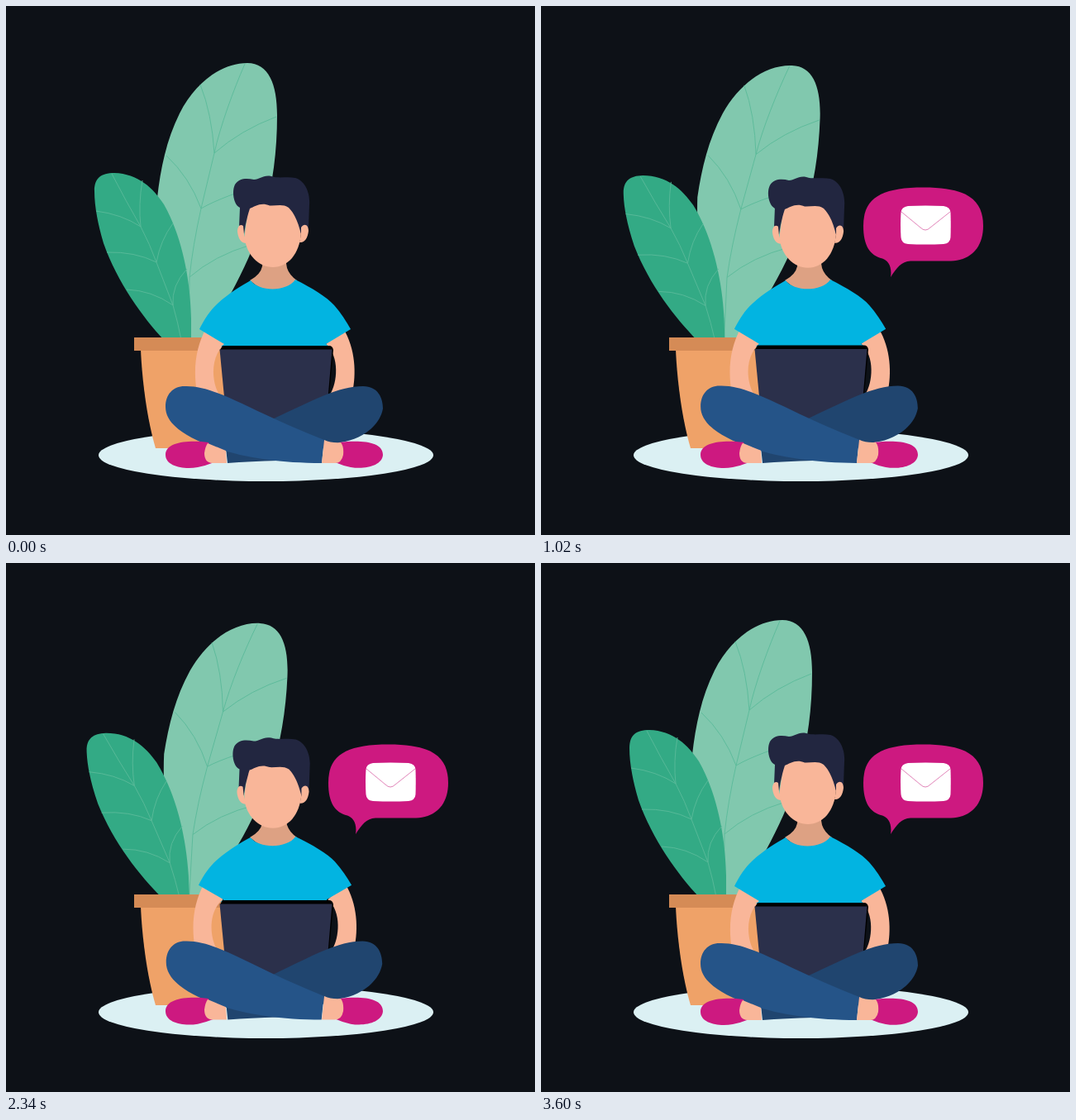
Recreate the animation shown at these times as an HTML page. Size 640x640 px, loop 3.66 s.

```html
<!DOCTYPE html>
<html lang="en">
<head>
<meta charset="utf-8">
<title>Working with a laptop</title>
<style>
  @property --sway { syntax: "<number>"; inherits: true; initial-value: 0; }
  @property --sit { syntax: "<number>"; inherits: true; initial-value: 0; }
  @property --pop { syntax: "<number>"; inherits: true; initial-value: 0; }

  html, body { margin: 0; width: 100%; height: 100%; overflow: hidden; background: #0d1117; }

  svg {
    display: block; width: 100vw; height: 100vh;
    animation: sway 3660ms infinite, sit 3660ms infinite, pop 3660ms infinite;
    animation-timing-function: cubic-bezier(.333, 0, .667, 1);
  }
  @keyframes sway { 0%, 98.36%, 100% { --sway: 0 } 49.18% { --sway: 1 } }
  @keyframes sit { 0%, 24.59%, 73.77%, 100% { --sit: 0 } 40.98%, 57.38% { --sit: 1 } }
  @keyframes pop { 0% { --pop: 0 } 21.31%, 100% { --pop: 1 } }

  .tall { transform-origin: 211px 419px; transform: rotate(calc(var(--sway) * 3.2deg)); }
  .low { transform-origin: 220px 455px; transform: rotate(calc(var(--sway) * -3deg)); }
  .face, .hair { transform-origin: 322px 260px; }
  .face { transform: translateY(calc(var(--sit) * 7.2px)) scaleX(calc(1 + var(--sit) * .02)); }
  .hair { transform: translateY(calc(var(--sit) * 8.7px)) scaleX(calc(1 + var(--sit) * .02)); }
  .shirt { transform-origin: 323px 332px; transform: scale(calc(1 + var(--sit) * .018), calc(1 - var(--sit) * .036)); }
  .arm-l { transform: translate(calc(var(--sit) * -3.7px), calc(var(--sit) * -3px)); }
  .arm-r { transform: translate(calc(var(--sit) * 3.7px), calc(var(--sit) * -3px)); }
  .laptop { transform: translateY(calc(var(--sit) * -4.6px)); }
  .feet, .legs { transform-origin: 324.5px 575px; }
  .feet { transform: scaleY(calc(1 + var(--sit) * .033)); }
  .legs { transform: scale(calc(1 - var(--sit) * .009), calc(1 + var(--sit) * .033)); }
  .bubble { transform-origin: 423px 328px; transform: scale(var(--pop)); }

  .vein { fill: none; stroke: #5bba9a; stroke-width: .9; }
  .skin { fill: #f9b699; }
  .pink { fill: #cd1980; }
</style>
</head>
<body>
<svg viewBox="0 0 640 640">
  <ellipse cx="314.5" cy="543.5" rx="202.5" ry="31.5" fill="#dbf0f3"/>

  <g class="tall">
    <path fill="#81c8ae" d="M238 404C262 368 283 330 297 296C319 243 328 190 328 132C328 95 318 69 292 69C260 69 229 93 210 130C194 162 187 197 183 232C183 300 200 360 212 413Z"/>
    <path class="vein" d="M289 70C275 102 259 146 252 178L236 245Q226 290 222 328L221 402M235 95Q249 130 252 178Q284 150 327 134M194 181Q222 207 236 245Q262 230 320 213M222 328Q252 302 296 289"/>
  </g>
  <g class="low">
    <path fill="#33aa85" d="M191 404C165 376 135 335 118 287C110 260 107 240 107 224C107 208 115 202 131 202C160 203 178 220 191 240C212 277 223 328 224 378V413H198Z"/>
    <path class="vein" d="M128 203Q145 236 163 267Q174 288 182 310L202 362Q208 383 212 404M165 211Q160 240 163 267Q140 252 109 248M202 263Q187 283 182 310Q156 297 122 298M219 318Q200 338 202 362Q176 344 146 343"/>
  </g>

  <path fill="#efa268" d="M163 416C165 460 172 505 181 535H270V416Z"/>
  <path fill="#d58b56" d="M155 401H262V417H155Z"/>

  <path fill="#dda183" d="M311 300H337L340 317Q343 326 352 332Q324 358 295 332Q308 325 310 315Z"/>
  <path class="skin arm-l" d="M242 390C230 412 226 438 231 468L262 478L258 470C249 456 246 424 265 409Z"/>
  <path class="skin arm-r" d="M408 390C423 415 424 445 419 468L388 476L392 470C401 456 404 424 387 409Z"/>
  <path class="shirt" fill="#02b4e1" d="M296 332C306 346 340 346 350 331C370 341 388 352 397 362C405 371 412 382 417 391L387 409L391 412H260L264 409L234 391C240 379 247 368 256 360C270 347 284 339 296 332Z"/>

  <path class="skin face" d="M289 275L294 238H350L357 275C355 300 341 316 323 316C305 316 291 300 289 282Z"/>
  <path class="hair" fill="#222640" d="M283 244C275 240 273 224 277 216C282 208 291 208 300 210C307 210 311 204 321 206C330 209 340 206 350 208C363 212 368 228 367 240L366 268L357 276C354 264 350 252 342 244C335 239 327 242 319 241.500C308 237 301 243 295 245Q290 260 288 276L282 268Z"/>
  <path class="skin face" d="M287 266C283 263 280 267 280 273C281 281 284 287 291 287L288 276ZM357 268C361 262 366 265 366 272C365 281 361 287 355 286L357 276Z"/>

  <g class="laptop">
    <path d="M262 411H391Q395 411 396 416L391 471H300L259 416Z"/>
    <path fill="#2b304b" d="M258.500 415.500H394.500L389.500 474L324 504L264.500 478Z"/>
  </g>

  <g class="legs">
    <path fill="#20456f" d="M324 499C372 477 402 460 432 460C450 460 456 474 456 487C452 510 427 525 405 528L382 535L330 550Q295 551 268 553L266 535Z"/>
    <path fill="#255488" d="M216 460C245 459 276 477 324 499Q352 512 385 525L382 553C335 553 290 547 255 535C215 521 193 505 193 485C193 470 202 460 216 460Z"/>
  </g>
  <g class="feet">
    <path class="pink" d="M245 528C222 525 193 527 193 543C193 557 215 561 232 558Q242 556 252 552ZM403 528C430 525 456 527 456 543C455 556 435 561 417 558Q407 556 398 552Z"/>
    <path class="skin" d="M244 529L266 538L267 553H250C243 553 240 548 240 541Q241 533 244 529ZM385 525Q394 529 405 528Q409 533 408 543Q406 553 398 553H382Z"/>
  </g>

  <g class="bubble">
    <path class="pink" d="M423 328C425 315 420 308 413 305.500C398 302 390 290 390 266C390 232 412 219.500 463 219.500C515 219.500 535 234 535 266C535 294 518 308 496 308.500H447C436 309 430 317 423 328Z"/>
    <path fill="#fff" d="M444 242Q465 241 487 242Q495 243 495.500 250Q496 265 495.500 280Q495 287 487 288Q465 289 444 288Q436 287 435.500 280Q434.500 265 435.500 250Q436 243 444 242Z"/>
    <path fill="none" stroke="#de78b2" stroke-width=".9" d="M436 249L459 268Q465 274 471 268L495 249"/>
  </g>
</svg>
</body>
</html>
```
